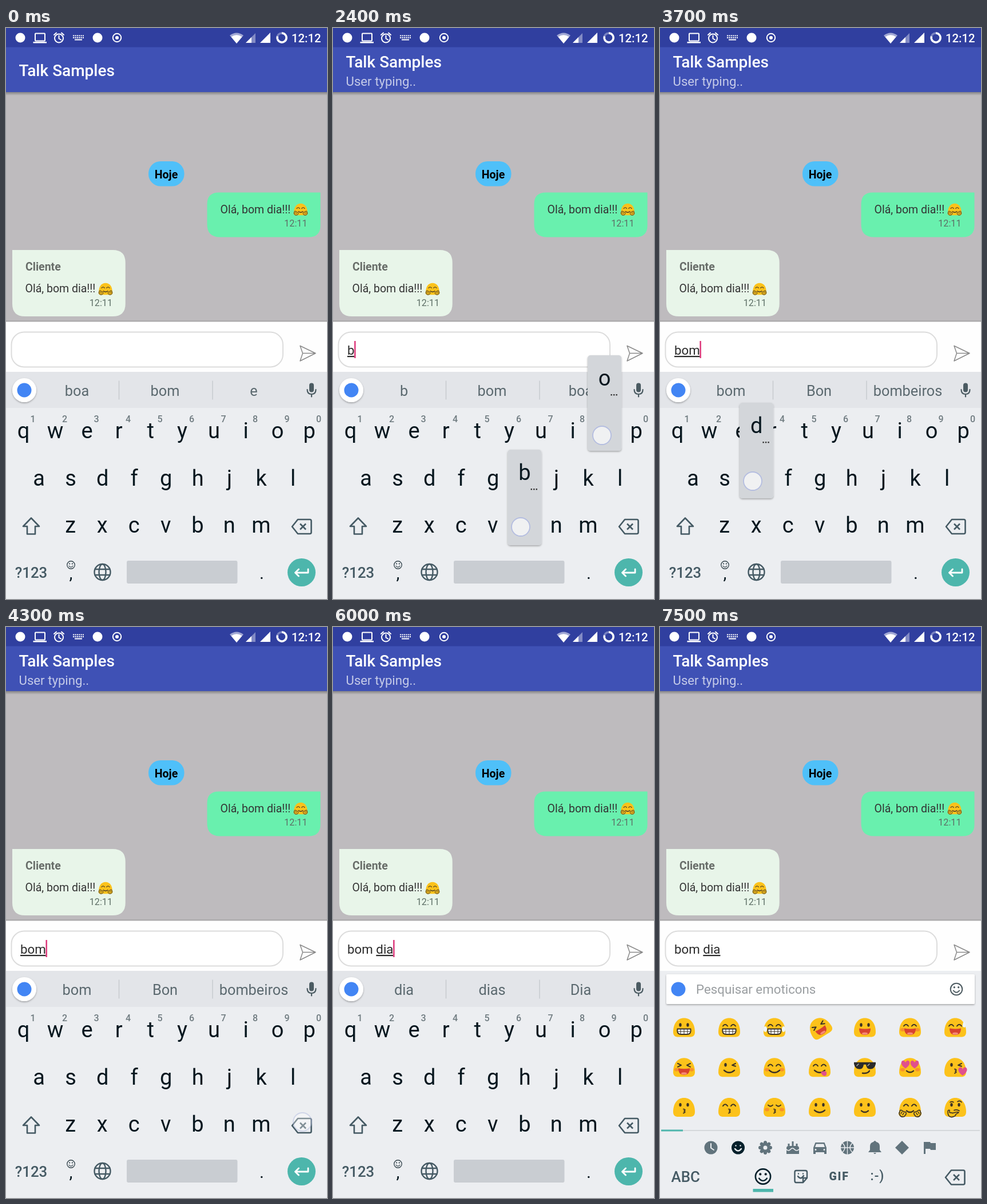
Recreate the animation shown at these times as an HTML page. Size 561 by 998 pixels, loop 8000 ms.

```html
<!DOCTYPE html>
<html lang="pt">
<head>
<meta charset="utf-8">
<title>Talk Samples</title>
<style>
html, body { margin: 0; width: 100%; height: 100%; overflow: hidden; background: #bebbbe; }
svg { display: block; width: 100vw; height: 100vh; font-family: Roboto, "Noto Sans", sans-serif; }
text { white-space: pre; }
.mid { text-anchor: middle; }
.end { text-anchor: end; }
.med { font-weight: 500; }
.bold { font-weight: 700; }
.line { fill: none; stroke-linecap: round; stroke-linejoin: round; }
.msg { font-size: 19.5px; fill: #333; }
.time { font-size: 16.2px; fill: #5d6f66; }
.key { font-size: 38px; fill: #07171f; text-anchor: middle; }
.key.dot { font-size: 30px; }
.hint { font-size: 16px; font-weight: 500; fill: #6f7b80; text-anchor: middle; }
.word { font-size: 25.3px; fill: #5b696f; text-anchor: middle; }
.word.best { font-weight: 700; fill: #0a0a0a; }
.cur { text-decoration: underline; text-decoration-thickness: 1.3px; text-underline-offset: 1.2px; }
</style>
</head>
<body>
<svg viewBox="0 0 561 998" preserveAspectRatio="none">
  <defs>
    <linearGradient id="fall" x2="0" y2="1">
      <stop stop-color="#000" stop-opacity=".3"/><stop offset="1" stop-color="#000" stop-opacity="0"/>
    </linearGradient>
    <filter id="drop" x="-30%" y="-30%" width="160%" height="160%">
      <feDropShadow dx="0" dy="1.5" stdDeviation="1.8" flood-opacity=".32"/>
    </filter>
    <g id="erase" class="line" stroke="#455a64" stroke-width="2.6">
      <path d="M-7-12.500H14Q16.500-12.500 16.500-10V10Q16.500 12.500 14 12.500H-7L-17 0Z"/>
      <path d="M-3-5L7 5M7-5L-3 5" stroke-linecap="butt"/>
    </g>
    <g id="smile" class="line" stroke="currentColor">
      <circle r="12.500" stroke-width="2.500"/>
      <path d="M-6.500 3Q0 11 6.500 3" stroke-width="2.300"/>
      <path d="M-4.500-4v.1M4.500-4v.1" stroke-width="4"/>
    </g>
  </defs>

  <!-- conversation -->
  <rect width="561" height="998" fill="#bebbbe"/>
  <rect x="249" y="233" width="62.500" height="43.500" rx="21" fill="#4fc0f9"/>
  <text class="mid bold" x="280" y="263" font-size="19.500">Hoje</text>
  <path d="M372 287.500H549.500V345Q549.500 365.500 529 365.500H374Q351.500 365.500 351.500 343V308Q351.500 287.500 372 287.500Z" fill="#69f0ae"/>
  <text class="msg" x="374.500" y="324">Olá, bom dia!!!</text>
  <text class="time end" x="526.500" y="347">12:11</text>
  <path d="M11 388H186.500Q208.700 388 208.700 410V482Q208.700 504 186.500 504H33Q11 504 11 482Z" fill="#e8f5e9"/>
  <text class="msg bold" x="34" y="424" style="fill:#686d69">Cliente</text>
  <text class="msg" x="33.500" y="462">Olá, bom dia!!!</text>
  <text class="time end" x="186" y="486">12:11</text>
  <g id="hugs"></g>

  <!-- header -->
  <rect y="112" width="561" height="6" fill="url(#fall)"/>
  <rect y="33" width="561" height="79" fill="#3f51b5"/>
  <rect width="561" height="33.500" fill="#303f9f"/>
  <text id="title" class="med" x="22.500" font-size="28" fill="#fff">Talk Samples</text>
  <text data-on="2400 8000" x="22.500" y="101" font-size="22.200" fill="#fff" fill-opacity=".7">User typing..</text>
  <g fill="#fff">
    <circle cx="25" cy="17" r="8.500"/>
    <path d="M47.500 24H71V26.500H47.500Z"/>
    <circle cx="160" cy="17" r="8.500"/>
    <circle cx="194" cy="17" r="3"/>
    <path d="M391 13Q403 4 415 13L403 27Z" opacity=".55"/>
    <path d="M393.500 15.500Q403 9 412.500 15.500L403 27Z"/>
    <path d="M419 26L436 9V26Z" opacity=".4"/><path d="M419 26L429 16V26Z"/>
    <path d="M444 26L462 8V26Z"/>
    <text class="med" x="499" y="24.500" font-size="20.300">12:12</text>
  </g>
  <g class="line" stroke="#fff" stroke-width="2">
    <rect x="51" y="9.500" width="17" height="13" rx="1"/>
    <circle cx="92.500" cy="18" r="7.500"/><path d="M92.500 13.500V18.500L96 20.500M84 12L88 8.500M101 12L97 8.500"/>
    <circle cx="194" cy="17" r="7.200"/>
    <circle cx="482" cy="17" r="8" stroke-width="3.500" opacity=".35"/>
    <path d="M482 9A8 8 0 1 1 474.500 14.500" stroke-width="3.500" stroke-linecap="butt"/>
    <path d="M117 13.500H136M117 17H136" stroke-width="2.200" stroke-dasharray="2.200 1.200" stroke-linecap="butt"/>
    <path d="M120 20.500H133" stroke-linecap="butt"/>
  </g>

  <!-- input -->
  <rect y="513" width="561" height="88.500" fill="#fefefe"/>
  <rect y="511" width="561" height="3" fill="#8e8c8e" opacity=".35"/>
  <rect x="9.500" y="531.500" width="474.500" height="61" rx="22" fill="#fff" stroke="#dcdcdc" stroke-width="2"/>
  <path class="line" d="M514 555.500L541 568.500L514 582L518.500 568.500ZM518.500 568.500H541" stroke="#8a8a8a" stroke-width="1.500"/>
  <text x="25" y="571" font-size="22.300" fill="#2b2b2b"><tspan id="done"></tspan><tspan id="now" class="cur"></tspan></text>
  <rect id="caret" y="547" width="2.600" height="30" fill="#de3f7f"
    data-on="200 700 1200 1700 2200 3300 3700 5500 6000 6500 7000 7500"/>

  <!-- keyboard -->
  <rect y="601" width="561" height="397" fill="#eceef1"/>
  <g data-on="0 7200">
    <rect y="601" width="561" height="63" fill="#e3e5e9"/>
    <circle cx="32" cy="633" r="21" fill="#fff" filter="url(#drop)"/>
    <circle cx="32" cy="633" r="12.500" fill="#4285f4"/>
    <path d="M197.500 616.500V649.500M361 616.500V649.500" stroke="#c7cbcf" stroke-width="1.500"/>
    <g id="words"></g>
    <rect x="530" y="620.500" width="8" height="16" rx="4" fill="#4b5b62"/>
    <path class="line" d="M526.500 632Q526.500 640 534 640T541.500 632M534 640V644.500" stroke="#4b5b62" stroke-width="2.200" stroke-linecap="butt"/>
    <g id="keys"></g>
    <path class="line" d="M44 856.500L58 871H51V884.500H37V871H30Z" stroke="#455a64" stroke-width="2.600"/>
    <use href="#erase" x="517" y="871.500"/>
    <text class="mid med" x="44" y="960.500" font-size="25.800" fill="#455a64">?123</text>
    <use href="#smile" transform="translate(113.500 938.500) scale(.54)" color="#37474f"/>
    <g class="line" stroke="#455a64" stroke-width="2.400">
      <circle cx="168.500" cy="951" r="14"/><ellipse cx="168.500" cy="951" rx="6" ry="14"/>
      <path d="M155.500 946H181.500M155.500 956H181.500"/>
    </g>
    <rect x="211" y="931" width="193.500" height="40" rx="3" fill="#c9cdd2"/>
    <circle cx="516.500" cy="951.500" r="24.500" fill="#4db6ac"/>
    <path class="line" d="M528 946V952H506M511.500 946L505.500 952L511.500 958" stroke="#fff" stroke-width="2.800" stroke-linecap="butt"/>
  </g>

  <!-- emoticon panel -->
  <g data-on="7200 8000">
    <rect x="11" y="607" width="539" height="52" rx="2" fill="#fff" filter="url(#drop)"/>
    <circle cx="32" cy="633" r="12.500" fill="#4285f4"/>
    <text x="63" y="641" font-size="22.300" fill="#9a9ea1">Pesquisar emoticons</text>
    <use href="#smile" transform="translate(518 633) scale(.82)" color="#4f5d63"/>
    <g id="grid"></g>
    <rect x="2" y="879" width="557" height="2" fill="#d5d8db"/>
    <rect x="2" y="878.500" width="38" height="3" fill="#4db6ac"/>
    <g fill="#61737c">
      <circle cx="89" cy="910" r="11.500"/>
      <circle cx="136.500" cy="910" r="11.500" fill="#06202b"/>
      <g id="petals"></g>
      <path d="M221 921V911Q221 907 225 907H239Q243 907 243 911V921Z"/>
      <path d="M225 903V907M232 899V907M239 903V907" stroke="#61737c" stroke-width="3"/>
      <path d="M268 910L271.500 901H287.500L291 910V921H287V918H272V921H268Z"/>
      <circle cx="327.500" cy="910" r="11.500"/>
      <path d="M364 918L367 914V908Q367 901 373 900Q375.500 896 378 900Q384 901 384 908V914L387 918ZM373 919H378Q375.500 923 373 919Z"/>
      <path d="M423 898L435 910L423 922L411 910Z"/>
      <path d="M461 900H472L473 902H482V914H473L472 912H464V921H461Z"/>
    </g>
    <g class="line" stroke="#eceef1" stroke-width="2">
      <path d="M89 903V910.500L94 914"/>
      <path d="M131 912Q136.500 919 142 912M132.500 906.500v.1M140.500 906.500v.1" stroke-width="2.500"/>
      <path d="M221 913Q224.500 917 228 913T235 913T243 913" stroke-width="1.600"/>
      <path d="M273 903.500H286L288 909H271Z" fill="#eceef1" stroke="none"/>
      <path d="M272 913.500v.1M287 913.500v.1" stroke-width="3"/>
      <path d="M316 910H339M327.500 899V921M319 902Q327 910 319 918M336 902Q328 910 336 918" stroke-width="1.300"/>
    </g>
    <text class="med" x="19.500" y="970" font-size="25.800" fill="#455a64">ABC</text>
    <use href="#smile" transform="translate(180 960.500) scale(1.050)" color="#06202b"/>
    <rect x="162.500" y="982" width="35.500" height="5.500" fill="#4db6ac"/>
    <g class="line" stroke="#455a64" stroke-width="2.400">
      <path d="M238 950H254Q257 950 257 953V963L250 971H238Q235.500 971 235.500 968V953Q235.500 950 238 950ZM257 963H250V971"/>
      <path d="M241 960Q246 967 251 959M242 955.500v.1M250 955.500v.1"/>
    </g>
    <text class="mid" x="313" y="967" font-size="19.500" font-weight="900" letter-spacing="1.800" fill="#455a64">GIF</text>
    <text class="mid med" x="380" y="967" font-size="23" letter-spacing="1" fill="#455a64">:-)</text>
    <use href="#erase" x="516" y="962"/>
  </g>
  <g id="press"></g>
</svg>
<script>
const LOOP = 8000, STEP = 100;
const $ = id => document.getElementById(id);
const fill = (id, parts) => { $(id).innerHTML = parts.join(''); };

// Keys
const keyPos = {};
const rows = [['qwertyuiop', 30.6, 717], ['asdfghjkl', 57.6, 800], ['zxcvbnm', 112.8, 882]];
rows.forEach(([letters, x, y]) => [...letters].forEach((c, i) => { keyPos[c] = [x + 55.5 * i, y]; }));
keyPos[','] = [113.5, 963];
keyPos['.'] = [447, 963];
const label = (c, x, y, cls = /\w/.test(c) ? 'key' : 'key dot') => `<text class="${cls}" x="${x}" y="${y}">${c}</text>`;
fill('keys', [
  ...Object.entries(keyPos).map(([c, [x, y]]) => label(c, x, y)),
  ...[...'1234567890'].map((d, i) => label(d, 47 + 55.5 * i, 689, 'hint'))
]);

// Emoticon faces
const DARK = '#3b3226';
const ink = (d, w = 2.4, c = DARK) => `<path class="line" d="${d}" stroke="${c}" stroke-width="${w}"/>`;
const shape = (d, c) => `<path d="${d}" fill="${c}"/>`;
const oval = (x, y, rx, ry, c) => `<ellipse cx="${x}" cy="${y}" rx="${rx}" ry="${ry}" fill="${c}"/>`;
const heart = (x, y, s) => `<path transform="translate(${x} ${y}) scale(${s})" d="M0 6C-10-1-6-7-2.500-6Q-.500-5.500 0-3Q.500-5.500 2.500-6C6-7 10-1 0 6Z" fill="#e0508c"/>`;
const hand = s => `<g transform="scale(${s} 1)">${oval(13, 11, 7, 6, '#fcc21b')}` +
  ink('M7 12Q6 7 10 8L15 5Q18 4 18 8Q20 10 18 13Q16 18 10 16Z', 1.6) + ink('M11 10L13 13M14 8L16 11', 1.4) + '</g>';
const eye = x => oval(x, -4.5, 2.2, 3.2, DARK);
const part = {
  dots: eye(-6.5) + eye(6.5),
  arcs: ink('M-11-2.500Q-7-8-3-2.500M3-2.500Q7-8 11-2.500', 2),
  shut: ink('M-11-4Q-7 0-3-4M3-4Q7 0 11-4', 2),
  squint: ink('M-11-7L-5-4L-11-1M11-7L5-4L11-1', 2),
  wink: eye(-6.5) + ink('M11-7L5-4L11-2', 2),
  hearts: heart(-8, -5, 1.15) + heart(8, -5, 1.15),
  shades: shape('M-19-9H19V-6Q17 3 9 3Q3 3 2-5H-2Q-3 3-9 3Q-17 3-19-6Z', '#2b2b2b') + ink('M-14-3L-11-6M5-3L8-6', 1.5, '#aaa'),
  teeth: `<path d="M-11.500 2.500H11.500Q13 12 5 12H-5Q-13 12-11.500 2.500Z" fill="#fff" stroke="${DARK}" stroke-width="1.800"/>` +
    ink('M-11 7H11M-6 3V11.500M0 3V11.500M6 3V11.500', 1),
  open: shape('M-10 1.500Q0 3.500 10 1.500Q10 13 0 13T-10 1.500Z', '#d8432f') + oval(0, 10.5, 5, 2, '#f58a76'),
  grin: ink('M-9 5Q0 13 9 5'),
  small: ink('M-6 6Q0 11 6 6'),
  smirk: ink('M-4 10Q5 11 8 6'),
  kiss: ink('M-1 3Q4 4 0 6.500Q4 8 -1 10', 1.9),
  tongue: shape('M2 8Q9 5 12 8Q13 14 9 15Q4 15 2 8Z', '#e0508c'),
  blush: oval(-13, 4, 4, 3, '#f79329') + oval(13, 4, 4, 3, '#f79329'),
  tears: oval(-16, 3, 3, 5, '#eef6fa') + oval(16, 3, 3, 5, '#eef6fa'),
  sweat: shape('M15-11Q21-2 16 0Q10-1 15-11Z', '#eef6fa'),
  heart: heart(13, 7, 1.2),
  hug: hand(1) + hand(-1),
  think: ink('M-9-9Q-6-11-3-9M4-10Q8-13 11-9', 1.7) + ink('M-2 5Q3 3 7 6', 1.8) +
    oval(-7, 11, 7, 6, '#fcc21b') + ink('M-13 8Q-13 17-6 17Q1 16 1 12L6 9Q4 7-4 10L-10 9V5Q-13 4-13 8Z', 1.6)
};
const blob = 'M-19 8C-19-6-12-16.500 0-16.500S19-6 19 8C19 14 16 16.500 10 16.500H-10C-16 16.500-19 14-19 8Z';
const face = (x, y, parts, more = '') =>
  `<g transform="translate(${x} ${y}) ${more}">${shape(blob, '#fcc21b')}${parts.split(' ').map(p => part[p]).join('')}</g>`;
const faces = [
  'dots teeth', 'arcs teeth', 'arcs teeth tears', 'squint open', 'dots open', 'blush arcs open', 'arcs open sweat',
  'squint blush open', 'wink grin', 'blush arcs grin', 'arcs grin tongue', 'shades smirk', 'blush hearts small', 'wink kiss heart',
  'dots kiss', 'arcs kiss', 'blush shut kiss', 'dots grin', 'dots small', 'arcs small hug', 'dots think'
];
fill('grid', faces.map((f, i) =>
  face(42 + 79 * (i % 7), 700 + 69.8 * Math.floor(i / 7), f, i === 3 ? 'rotate(-32)' : '')));
fill('hugs', [[515, 317], [174, 456]].map(([x, y]) => face(x, y, 'arcs small hug', 'scale(.62)')));
fill('petals', [
  ...Array.from({ length: 8 }, (_, i) => `<ellipse cx="184" cy="902" rx="3.200" ry="4" transform="rotate(${45 * i} 184 910)"/>`),
  '<circle cx="184" cy="910" r="5"/><circle cx="184" cy="910" r="3.500" fill="#eceef1"/>'
]);

// Presses: key, down, up, finger x and y, text after release, suggestions
const start = { text: '', words: ['boa', 'bom', 'e'] };
const bom = ['bom', 'Bon', 'bombeiros'];
const presses = [
  ['b', 2200, 2400, 328, 872, 'b', ['b', 'bom', 'boa']],
  ['o', 2400, 2500, 470, 712, 'bo', ['bo', 'bom', 'boa']],
  ['m', 2600, 2700, 440, 874, 'bom', bom],
  ['d', 3700, 3900, 162, 792, 'bomd', ['bomd', 'bom', 'bons']],
  ['', 4000, 4200, 518, 865, 'bom', bom],
  ['', 4400, 4500, 300, 950, 'bom ', ['dia', 'e', 'para']],
  ['d', 4600, 4700, 160, 792, 'bom d', ['d', 'dia', 'de']],
  ['i', 4700, 4800, 404, 720, 'bom di', ['di', '*dia', 'divertimento']],
  ['a', 4900, 5000, 18, 792, 'bom dia', ['dia', 'dias', 'Dia']],
  [',', 6300, 7100, 110, 952, 'bom dia', ['dia', 'dias', 'Dia']]
].map(([key, down, up, x, y, text, words]) => ({ key, down, up, x, y, text, words }));
const LINGER = 200;

function popup(key) {
  const [x, y] = keyPos[key];
  return `<rect x="${x - 29.5}" y="${y - 145}" width="59" height="167" rx="5" fill="#d3d6da" filter="url(#drop)"/>` +
    label(key, x, y - 92) +
    [12, 16.5, 21].map(d => `<rect x="${x + d - 1.2}" y="${y - 77}" width="2.400" height="2.400" fill="#333"/>`).join('');
}

function touch(p, t) {
  const alpha = t < p.up ? 1 : 1 - (t - p.up) / LINGER;
  return `<circle cx="${p.x}" cy="${p.y}" r="16" fill="#fff" fill-opacity=".65" stroke="#b4bde0" stroke-width="1.800" opacity="${alpha}"/>`;
}

function suggestion(raw, i) {
  const best = raw[0] === '*', word = best ? raw.slice(1) : raw;
  const size = word.length > 10 ? ' style="font-size:22.300px"' : '';
  return `<text class="word${best ? ' best' : ''}"${size} x="${[124, 278, 433][i]}" y="642.500">${word}</text>`;
}

const timed = [...document.querySelectorAll('[data-on]')].map(el => [el, el.dataset.on.split(' ').map(Number)]);

function draw(t) {
  for (const [el, marks] of timed) {
    const passed = marks.filter(m => m <= t).length;
    el.style.display = passed % 2 ? '' : 'none';
  }
  $('title').setAttribute('y', t < 2400 ? 84 : 69);

  const { text, words } = presses.filter(p => p.up <= t).pop() || start;
  const cut = text.lastIndexOf(' ') + 1;
  $('done').textContent = text.slice(0, cut).replace(/ /g, '\u00a0');
  $('now').textContent = text.slice(cut);
  $('caret').setAttribute('x', 24.6 + (text ? $('now').parentNode.getComputedTextLength() : 0));
  fill('words', words.map(suggestion));

  const live = presses.filter(p => p.down <= t && t < p.up + LINGER && t < 7200);
  fill('press', [...live.filter(p => p.key).map(p => popup(p.key)), ...live.map(p => touch(p, t))]);
}

let last = -1;
function tick() {
  const t = Math.floor(performance.now() % LOOP / STEP) * STEP;
  if (t !== last) draw(last = t);
  requestAnimationFrame(tick);
}
tick();
</script>
</body>
</html>
```
